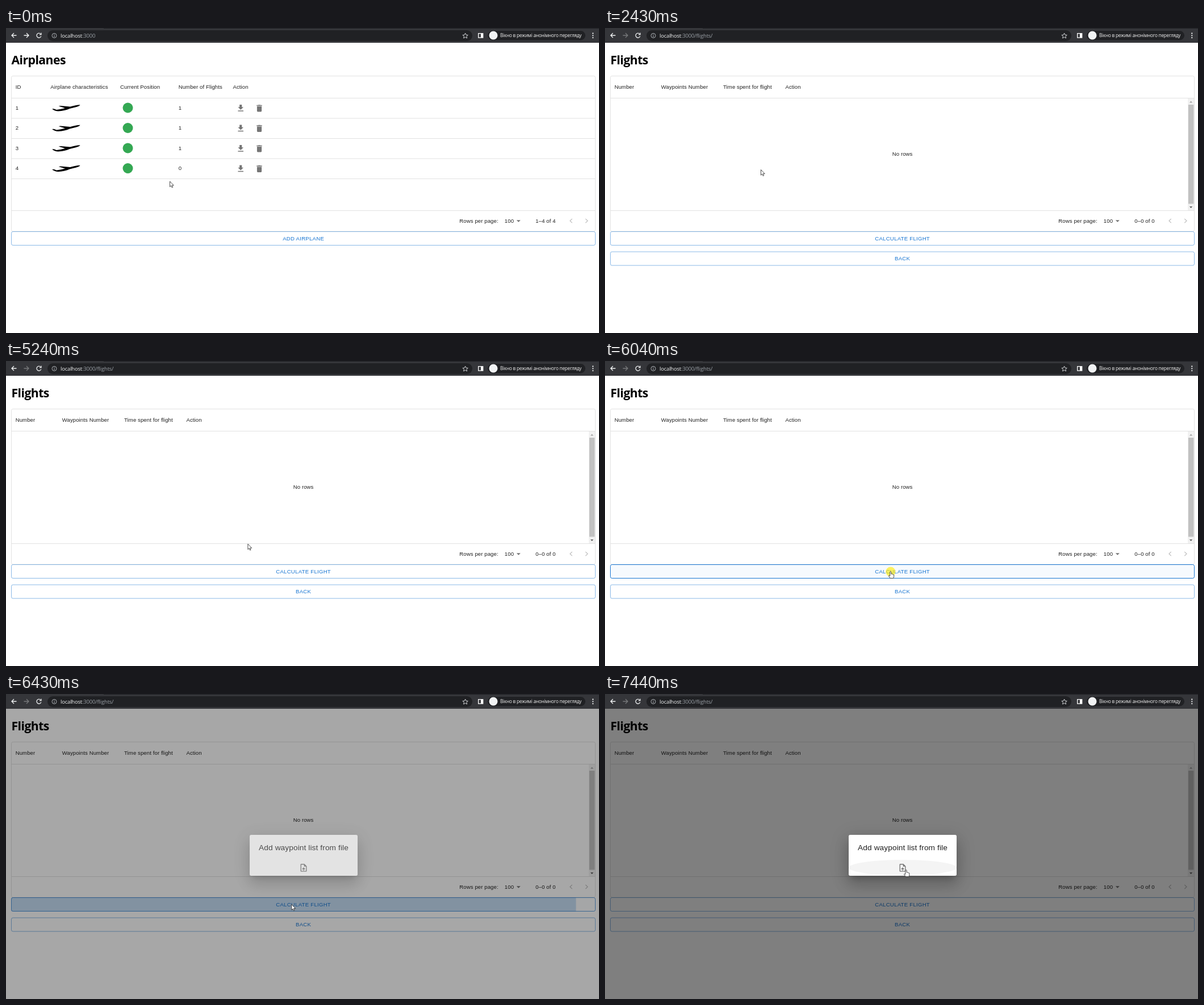
Animation of 1044 by 537 pixels, one loop 8000 ms. Source, as an HTML page:

```html
<!DOCTYPE html>
<html lang="en">
<head>
<meta charset="utf-8">
<title>Airplanes</title>
<style>
  html, body { margin: 0; width: 100%; height: 100%; overflow: hidden; background: #fff; }
  svg { position: absolute; left: 0; top: 0; }
  text { font: 9.57px "Liberation Sans", Arial, sans-serif; letter-spacing: .0107em; fill: #212121; white-space: pre; }
  .h1 { font: bold 21.2px "Open Sans", sans-serif; letter-spacing: -.55px; fill: #000; }
  .url { font: 9.5px "Open Sans", sans-serif; letter-spacing: -.2px; fill: #9aa0a6; }
  .chip { font: 8.2px "Open Sans", sans-serif; letter-spacing: -.22px; fill: #f1f1f1; }
  .btn { letter-spacing: .0286em; fill: #1976d2; }
  .title { font-size: 13.68px; letter-spacing: .0075em; }
  .line { fill: none; stroke: #e2e2e2; }
  .icon { fill: #757575; }
  .bar { fill: none; stroke: #f1f3f4; stroke-width: 1.3; }
  .thin { fill: none; stroke: #bdbdbd; stroke-width: 1.2; }
  .pointer { fill: #fff; stroke: #222; stroke-width: .8; stroke-linejoin: round; }
  #dim { position: absolute; left: 0; top: 26px; width: 1044px; height: 511px; background: #000; }
  #dialog {
    position: absolute; left: 428.5px; top: 248px; width: 190px; height: 71.5px;
    border-radius: 2.7px; background: #fff;
    box-shadow: 0 7.5px 10px -5px rgba(0,0,0,.2), 0 16px 26px 2px rgba(0,0,0,.14), 0 6px 31px 5px rgba(0,0,0,.12);
  }
</style>
</head>
<body>
<svg id="page" width="1044" height="537"></svg>
<div id="dim"></div>
<div id="dialog">
  <svg width="190" height="72">
    <ellipse id="iconHover" cx="95" cy="57.7" rx="95" ry="13.8" fill="#000"/>
    <text class="title" x="95" y="27" text-anchor="middle">Add waypoint list from file</text>
    <path class="icon" transform="translate(86.8 49.7) scale(.684)" d="M14 2H6c-1.1 0-1.99.9-1.99 2L4 20c0 1.1.89 2 1.99 2H18c1.1 0 2-.9 2-2V8l-6-6zm4 18H6V4h7v5h5v11zM8 15.01l1.41 1.41L11 14.84V19h2v-4.16l1.59 1.59L16 15.01 12.01 11z"/>
  </svg>
</div>
<svg id="top" width="1044" height="537">
  <circle id="press" r="8.5" fill="#ffeb00" opacity=".62"/>
  <g id="cursor">
    <path id="arrow" class="pointer" d="M0 0V9.6L2.2 7.6L3.7 11L5.2 10.3L3.8 7.1H6.8Z"/>
    <path id="hand" class="pointer" d="M-1.1 .8Q0-.7 1.1 .8V4.6Q2 4 2.8 4.9Q3.8 4.4 4.4 5.4Q5.6 5 5.8 6.3V9Q5.6 10.8 4.6 12H-.6Q-1.8 10.3-3.6 7.9Q-3.2 6.4-1.1 8Z"/>
  </g>
</svg>
<script>
'use strict';
const LOOP = 8000;
const $ = id => document.getElementById(id);

// ---------- static drawing ----------
const text = (x, y, s, cls = '', anchor = 'start') =>
  `<text x="${x}" y="${y}" class="${cls}" text-anchor="${anchor}">${s}</text>`;
const rect = (x, y, w, h, attrs) => `<rect x="${x}" y="${y}" width="${w}" height="${h}" ${attrs}/>`;
const path = (d, attrs) => `<path d="${d}" ${attrs}/>`;
const icon = (x, y, d) => path(d, `class="icon" transform="translate(${x} ${y}) scale(.684)"`);

const DOWNLOAD = 'M5 20h14v-2H5zM19 9h-4V3H9v6H5l7 7z';
const TRASH = 'M6 19c0 1.1.9 2 2 2h8c1.1 0 2-.9 2-2V7H6v12zM19 4h-3.5l-1-1h-5l-1 1H5v2h14V4z';
const PLANE = 'M130.5 135.2Q129.5 138 118 140.4L112 142Q104 145.8 92 146.6Q86 146.5 81 142.6L84.3 142.3L89 144Q97 143 104 141L92.5 137.6L96 136.9L113 138.6Q123 135.6 130.5 135.2Z';

const button = (y, label, id = '') =>
  rect(9.5, y + .5, 1028, 24, `id="${id}" rx="2.7" fill="#1976d2" fill-opacity="0" stroke="#1976d2" stroke-opacity=".5"`) +
  text(523.6, y + 15.6, label, 'btn', 'middle');

const toolbar = () =>
  rect(0, 0, 1044, 26, 'fill="#35363a"') +
  rect(172, 0, 872, 1, 'fill="#202124"') +
  rect(73, 4, 748, 19, 'rx="9.5" fill="#202124"') +
  rect(848, 5, 172, 16.5, 'rx="8.2" fill="#202124"') +
  path('M18.5 13H10M14 9L10 13L14 17', 'class="bar"') +
  path('M31.5 13H40M36 9L40 13L36 17', 'class="bar" id="forward"') +
  path('M61 10.4A4 4 0 1 0 61.8 14.4M62 8.6V11.6H59', 'class="bar"') +
  '<circle cx="85" cy="13.4" r="4" fill="none" stroke="#bdc1c6" stroke-width=".9"/>' +
  path('M85 13V15.7M85 11V12', 'stroke="#bdc1c6"') +
  text(96, 16.8, '<tspan fill="#f1f3f4">localhost</tspan>:3000<tspan id="route"></tspan>', 'url') +
  path('M808.6 9L810 12.1L813.3 12.4L810.8 14.6L811.6 17.9L808.6 16.2L805.6 17.9L806.4 14.6L803.9 12.4L807.2 12.1Z',
    'fill="none" stroke="#dfe1e5" stroke-width=".9"') +
  rect(831.7, 9.6, 8, 7.4, 'fill="none" stroke="#fff" stroke-width="1.3"') +
  rect(836, 9.6, 4, 7.4, 'fill="#fff"') +
  '<circle cx="858" cy="13" r="7.5" fill="#f1f3f4"/>' +
  text(870, 16, 'Вікно в режимі анонімного перегляду', 'chip') +
  [9.5, 13.3, 17.1].map(y => `<circle cx="1033.3" cy="${y}" r="1.15" fill="#f1f3f4"/>`).join('');

const grid = (heading, columns, range) =>
  text(9.5, 64.3, heading, 'h1') +
  rect(9.5, 84.5, 1028, 273.5, 'rx="2.7" class="line"') +
  path('M10 123.5H1037M10 321.5H1037', 'class="line"') +
  columns.map(([x, s]) => text(x, 107.3, s)).join('') +
  text(798.3, 342.8, 'Rows per page:') + text(877.8, 342.5, '100') +
  path('M898.8 338.3H905.8L902.3 341.8Z', 'class="icon"') +
  text(932.3, 342.8, range) +
  path('M996.7 335.8L993 339.5L996.7 343.2M1020.3 335.8L1024 339.5L1020.3 343.2', 'class="thin"');

const row = (flights, i) => {
  const dy = 35.5 * i;
  return `<g transform="translate(0 ${dy})">` +
    text(16.7, 143.8, i + 1) + text(303.7, 143.8, flights) +
    path(PLANE, 'fill="#000"') +
    '<circle cx="214.5" cy="140.5" r="9" fill="#34a853"/>' +
    icon(405, 133, DOWNLOAD) + icon(437.8, 133.1, TRASH) +
    path('M10 159H1037', 'class="line"') + '</g>';
};

const airplanes = () =>
  rect(10, 230, 1027, 35.5, 'id="rowHover" fill="#000" fill-opacity=".043"') +
  grid('Airplanes', [[16.7, 'ID'], [78.3, 'Airplane characteristics'], [201, 'Current Position'],
    [303.7, 'Number of Flights'], [399.5, 'Action']], '1–4 of 4') +
  [1, 1, 1, 0].map(row).join('') +
  rect(194.5, 230.5, 102, 35, 'id="cell" fill="none" stroke="#1976d2" stroke-width=".9"') +
  button(358, 'ADD AIRPLANE');

const flights = () =>
  grid('Flights', [[16.7, 'Number'], [98.7, 'Waypoints Number'], [208, 'Time spent for flight'],
    [317.5, 'Action']], '0–0 of 0') +
  text(523.6, 225.3, 'No rows', '', 'middle') +
  rect(1026, 124, 11, 197, 'fill="#f1f1f1"') +
  rect(1027, 135, 9.3, 174.5, 'fill="#c1c1c1"') +
  path('M1029 131.4H1034.2L1031.6 128.6Z', 'fill="#a3a3a3"') +
  path('M1029 314.2H1034.2L1031.6 317Z', 'fill="#505050"') +
  '<clipPath id="clip"><rect x="9" y="358" width="1029" height="25" rx="2.7"/></clipPath>' +
  '<g clip-path="url(#clip)"><circle id="ripple" cx="503" cy="370.5" fill="#1976d2"/></g>' +
  button(358, 'CALCULATE FLIGHT', 'calc') + button(393.5, 'BACK');

$('page').innerHTML = toolbar() + `<g id="listView">${airplanes()}</g><g id="flightView">${flights()}</g>`;

// ---------- timing ----------
// [first step, last step, number of steps]
const SPANS = [
  [820, 1170, 6], [1840, 1840, 1], [2170, 2430, 5], [4440, 4650, 4], [4980, 5590, 10],
  [6040, 6040, 1], [6090, 6430, 6], [6490, 6760, 4], [7020, 7440, 7],
];
// [start, end, x, y]: the pointer reaches x, y at the end
const MOVES = [
  [750, 1170, 274.5, 249.5], [4370, 4650, 381, 294], [4912, 5590, 502.8, 370.5], [6950, 7440, 530, 309.5],
];
const HOME = [288.5, 270];

const clamp = v => Math.min(1, Math.max(0, v));
const ramp = (t, a, b) => clamp((t - a) / (b - a));
const smooth = p => p * p * (3 - 2 * p);
const glide = p => (2 * smooth(p) + p) / 3;

// cubic-bezier(.4, 0, .2, 1)
function ease(p) {
  let lo = 0, hi = 1;
  for (let i = 0; i < 20; i++) {
    const s = (lo + hi) / 2, r = 1 - s;
    if (1.2 * r * r * s + .6 * r * s * s + s * s * s < p) lo = s; else hi = s;
  }
  return smooth((lo + hi) / 2);
}

function snap(t) {
  let last = 0;
  for (const [a, b, n] of SPANS) {
    if (t < a) break;
    const gap = n > 1 ? (b - a) / (n - 1) : 1;
    last = a + gap * Math.min(n - 1, Math.floor((t - a) / gap + 1e-6));
  }
  return last;
}

function pointer(t) {
  let [x, y] = HOME;
  for (const [a, b, px, py] of MOVES) {
    const p = glide(ramp(t, a, b));
    x += (px - x) * p;
    y += (py - y) * p;
  }
  return [x, y];
}

const show = (id, on) => { $(id).style.display = on ? '' : 'none'; };
const set = (id, name, v) => $(id).setAttribute(name, v);

const OPEN = 6331;

function draw(now) {
  const t = snap(now);
  const [x, y] = pointer(t);
  const onFlights = t >= 2235;

  show('listView', !onFlights);
  show('flightView', onFlights);
  $('route').textContent = onFlights ? '/flights/' : '';
  set('forward', 'opacity', onFlights ? .35 : 1);
  show('rowHover', y < 265);
  show('cell', t >= 1840);

  const hover = ease(ramp(t, 5400, 5590)) * (1 - ease(ramp(t, OPEN, OPEN + 250)));
  set('calc', 'fill-opacity', .04 * hover);
  set('calc', 'stroke-opacity', .5 + .5 * hover);

  const grow = ease(ramp(t, 6048, 6598));
  set('ripple', 'r', 535 * grow);
  set('ripple', 'opacity', (.1 + .2 * grow) * (1 - ease(ramp(t, OPEN, 6760))));

  const fade = ease(ramp(t, OPEN, OPEN + 225));
  $('dim').style.opacity = .5 * fade;
  $('dialog').style.opacity = fade;
  const onIcon = t >= 7020 && y < 319;
  set('iconHover', 'opacity', onIcon ? .043 : 0);

  const hand = onIcon || (onFlights && y > 358 && t < OPEN);
  show('hand', hand);
  show('arrow', !hand);
  set('cursor', 'transform', `translate(${x} ${y})`);
  show('press', (t >= 1840 && t < 2170) || (t >= 6040 && t < OPEN));
  set('press', 'cx', x);
  set('press', 'cy', y + .6);
}

const start = performance.now();
function frame() {
  draw((performance.now() - start) % LOOP);
  requestAnimationFrame(frame);
}
frame();
</script>
</body>
</html>
```
